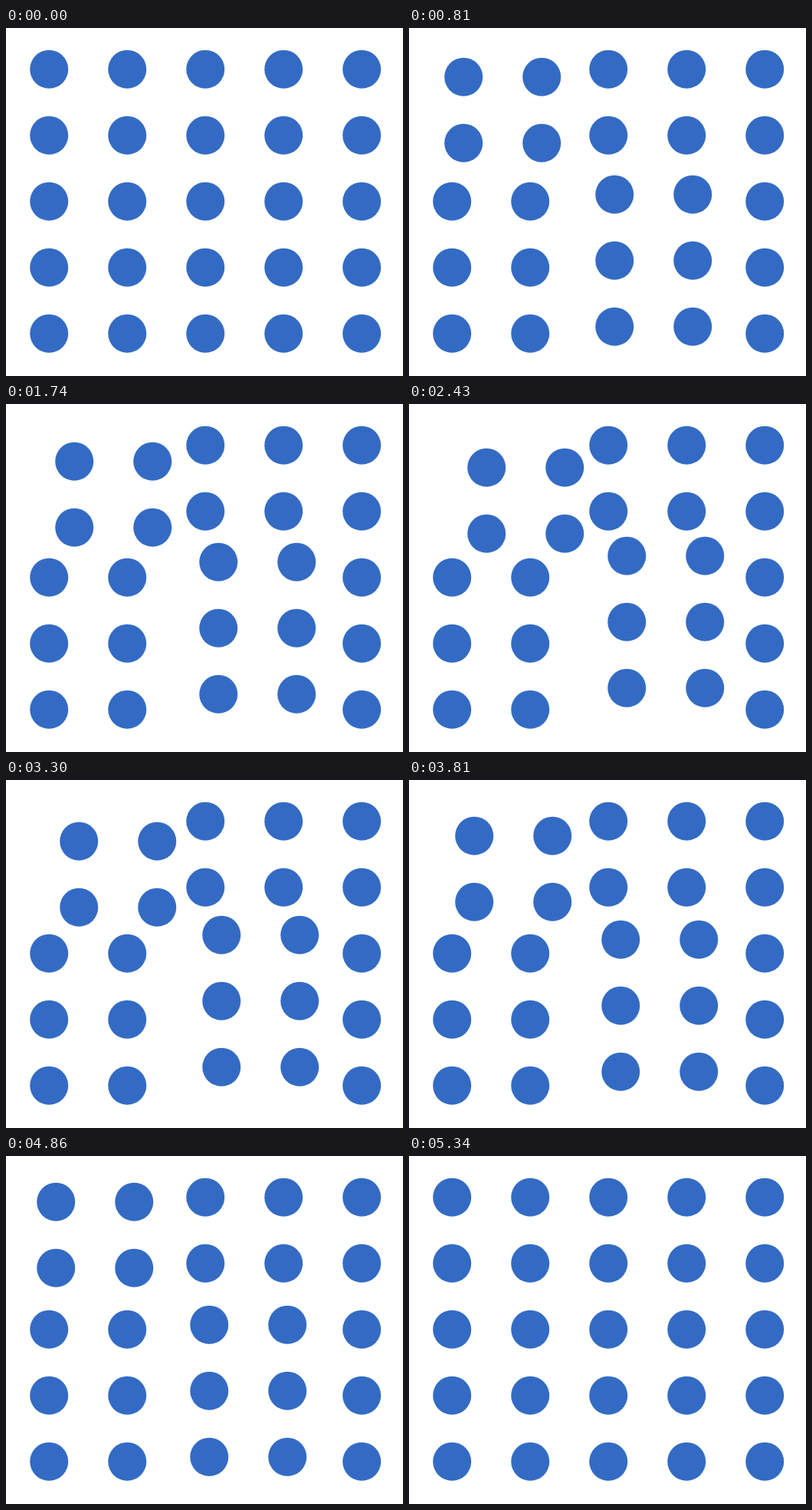
Recreate the animation shown at these times as an HTML page. Size 518x453 px, loop 5.37 s.

```html
<!DOCTYPE html>
<html lang="en">
<head>
<meta charset="utf-8">
<title>Dot grid</title>
<style>
  html, body { margin: 0; width: 100%; height: 100%; overflow: hidden; background: #fff; }
  svg { display: block; }
  circle { fill: #336bc4; }
</style>
</head>
<body>
<svg width="518" height="453">
  <g id="still"></g>
  <g id="upper"></g>
  <g id="lower"></g>
</svg>
<script>
const LOOP = 5370, STEP = 30, TURN = 2700, END = 5340;

// Furthest offset [x, y] of each block on the way out and on the way back
const blocks = {
  upper: { out: [50.5, 32.65], back: [50.5, 33.31] },
  lower: { out: [26.7, -30.7], back: [27.2, -31.35] }
};

function blockOf(row, col) {
  if (row < 2 && col < 2) return 'upper';
  if (row > 1 && (col === 2 || col === 3)) return 'lower';
  return 'still';
}

for (let row = 0; row < 5; row++) {
  for (let col = 0; col < 5; col++) {
    const dot = document.createElementNS('http://www.w3.org/2000/svg', 'circle');
    dot.setAttribute('cx', 56.2 + 102 * col);
    dot.setAttribute('cy', 53.7 + 86 * row);
    dot.setAttribute('r', 25);
    document.getElementById(blockOf(row, col)).append(dot);
  }
}

function draw() {
  const t = Math.floor(performance.now() % LOOP / STEP) * STEP;
  const leaving = t <= TURN;
  const part = leaving ? t / TURN : (END - t) / (END - TURN);
  for (const id in blocks) {
    const reach = leaving ? blocks[id].out : blocks[id].back;
    // Blocks move by whole pixels
    const [x, y] = reach.map(d => Math.sign(d) * Math.round(Math.abs(d) * part));
    document.getElementById(id).setAttribute('transform', `translate(${x} ${y})`);
  }
  requestAnimationFrame(draw);
}
draw();
</script>
</body>
</html>
```
